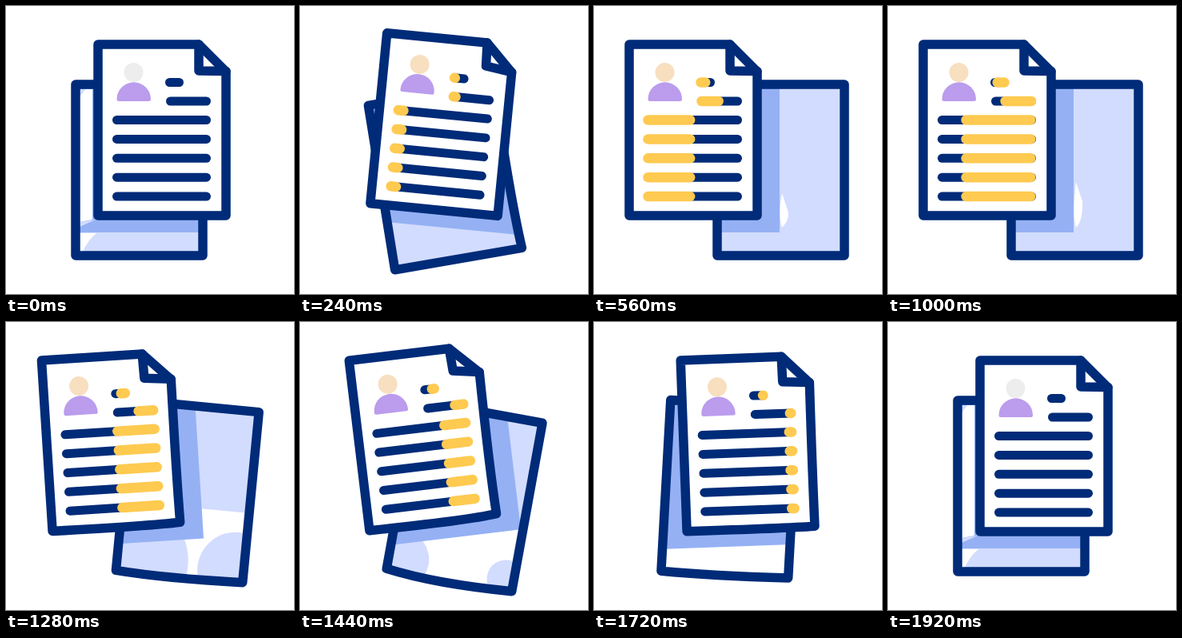
These frames come from a looping animation (360 px wide and 360 px high, 2 s). An HTML page:

```html
<!DOCTYPE html>
<html lang="en">
<head>
<meta charset="utf-8">
<title>Documents</title>
<style>
  html, body { margin: 0; width: 100%; height: 100%; overflow: hidden; background: #fff; }
  svg { display: block; width: 100vw; height: 100vh; }
  .line { fill: none; stroke: #002b78; stroke-width: 11.5; stroke-linecap: round; stroke-linejoin: round; }
  .bar { stroke-width: 11; }
  .mark { stroke: #ffca50; stroke-width: 12.5; }
  .light { fill: #d2dcfe; }
  .shade { fill: #95b1f4; }
  .white { fill: #fff; }
</style>
</head>
<body>
<svg viewBox="0 0 360 360">
  <defs><clipPath id="sheet"><path id="sheetClip"/></clipPath></defs>
  <g clip-path="url(#sheet)">
    <rect class="light" width="360" height="360"/>
    <g id="glare">
      <rect class="white" x="80" y="225" width="180" height="105"/>
      <circle id="glareLeft" class="light" cx="100" cy="298"/>
      <circle id="glareRight" class="light" cx="236" cy="298"/>
    </g>
    <rect id="shade" class="shade" x="-100" y="-100" width="403" height="383"/>
    <g id="restGlints">
      <path class="white" d="M92 113L99 104H108V267L92 270Z"/>
      <path class="light" d="M92 104H99L92 113ZM92 270L112 267L92 276Z"/>
      <path class="white" d="M92 284H113Q102 293 96 307H92Z"/>
    </g>
    <g id="swingGlints" class="white">
      <path d="M106 262Q128 260 150 276Q146 286 128 281Q116 268 106 262Z"/>
      <path d="M129 300Q138 299 138 303L130 308Z"/>
    </g>
    <path id="sliver" class="white"/>
  </g>
  <path id="back" class="line"/>
  <g id="front">
    <path id="page" class="line" style="fill:#fff"/>
    <path id="fold" class="line"/>
    <circle id="head" cx="159.5" cy="83" r="12"/>
    <path fill="#bb9ced" d="M138.5 116.5a21.2 21.2 0 0 1 42.5 0q0 2.5-2.5 2.5h-37.5q-2.5 0-2.5-2.5z"/>
    <g id="bars"></g>
  </g>
</svg>
<script>
const LOOP = 2000;
const $ = id => document.getElementById(id);
const set = (id, name, value) => $(id).setAttribute(name, value);
const show = (id, on) => set(id, 'visibility', on ? 'visible' : 'hidden');
const span = (t, a, b) => Math.min(1, Math.max(0, (t - a) / (b - a)));
const smooth = x => x * x * (3 - 2 * x);
const glide = x => 0.8 * smooth(x) + 0.2 * x;

function line(cls) {
  const el = document.createElementNS('http://www.w3.org/2000/svg', 'path');
  el.setAttribute('class', 'line ' + cls);
  $('bars').append(el);
  return el;
}

// Each row: left end, right end, height
const rows = [[204.5, 216.5, 95.5], [205.5, 250.5, 119]];
for (let i = 0; i < 5; i++) rows.push([138.5, 250.5, 142.5 + i * 23.9]);
const marks = rows.map(([a, b, y]) => {
  line('bar').setAttribute('d', `M${a} ${y}H${b}`);
  return line('mark');
});

function draw(t) {
  const out = span(t, 100, 560);
  const home = span(t, 1175, 1780);
  const shift = glide(out) - glide(home);
  const outArc = Math.sin(Math.PI * out);
  const homeArc = Math.sin(Math.PI * home);

  // The two sheets swing apart and back, tilting opposite ways
  const frontPose = `translate(${-71 * shift} ${-8.4 * outArc - 10.2 * homeArc}) ` +
    `rotate(${6.8 * outArc - 7 * homeArc} 195 155)`;
  const backPose = `translate(${166.5 + 67 * shift - 1.5 * outArc} ${205 + 10.3 * outArc + 12.5 * homeArc}) ` +
    `rotate(${10.5 * homeArc - 11.9 * outArc}) scale(1 ${1 - 0.033 * outArc}) translate(-166.5 -205)`;
  const left = 87 - 2.5 * outArc;
  const sheet = `M87 98H246Q${246 - 5 * outArc} 240 246 312Q150 ${312 + 8 * homeArc} ${left} 312Z`;

  for (const id of ['back', 'sheetClip']) {
    set(id, 'd', sheet);
    set(id, 'transform', backPose);
  }
  for (const id of ['glare', 'restGlints', 'swingGlints', 'sliver']) set(id, 'transform', backPose);
  set('front', 'transform', frontPose);
  set('shade', 'transform', frontPose);

  const bend = 2 * homeArc;
  set('page', 'd', `M115 48H241L275 82Q${275 - bend} 200 275 ${262 - bend}Q240 ${262 + bend} 115 262Z`);
  const curl = 5 * (outArc + homeArc);
  set('fold', 'd', `M241 48L${241 + curl * 0.3} ${81 - curl}L275 81.5`);

  // Highlights on the back sheet
  const resting = t < 100 || t > 1790;
  const fade = 1 - span(t, 1300, 1580);
  show('restGlints', resting);
  show('swingGlints', t > 320 && t < 500);
  show('sliver', t > 500 && t < 1240);
  show('glare', t > 1280 && !resting);
  set('glareLeft', 'r', 76 * fade);
  set('glareRight', 'r', 48 * fade);
  const top = 234 - 14 * span(t, 560, 1000);
  set('sliver', 'd', `M168 ${top}Q172 ${top + 12} 176 ${top + 24}Q177 268 168 277Q163 262 168 ${top}Z`);

  set('head', 'fill', resting ? '#ededed' : '#f7dfc0');

  const end = smooth(span(t, 100, 1060));
  const start = smooth(span(t, 560, 1855));
  rows.forEach(([a, b, y], i) => {
    const at = k => a + (b - a) * k;
    marks[i].setAttribute('d', end > start ? `M${at(start)} ${y}H${at(end)}` : '');
  });
}

const began = performance.now();
function tick() {
  draw((performance.now() - began) % LOOP);
  requestAnimationFrame(tick);
}
draw(0);
requestAnimationFrame(tick);
</script>
</body>
</html>
```
